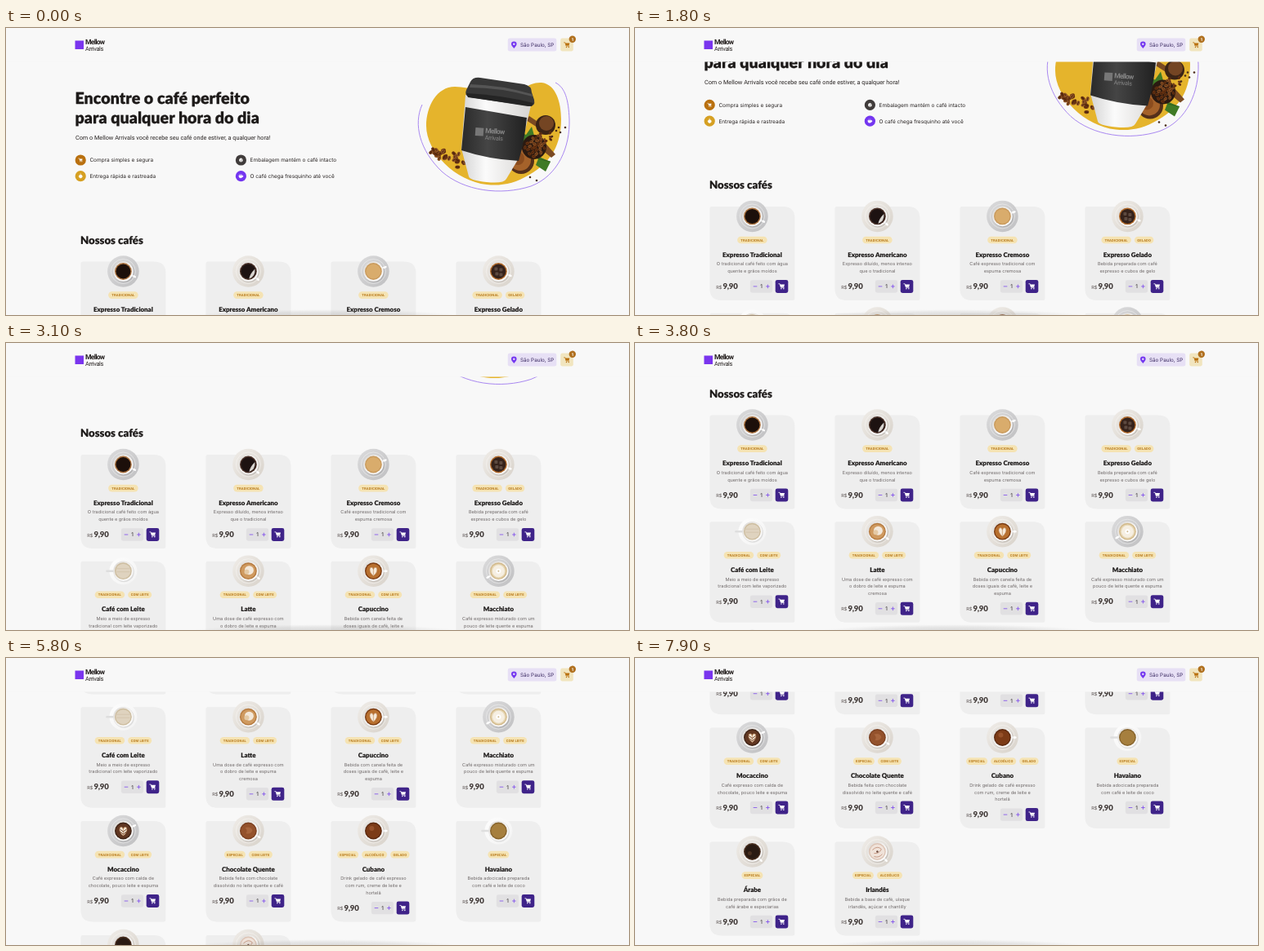
Recreate the animation shown at these times as an HTML page. Size 762x352 px, loop 8000 ms.

```html
<!DOCTYPE html>
<html lang="pt-BR">
<head>
<meta charset="utf-8">
<style>
html, body { margin: 0; width: 100%; height: 100%; overflow: hidden; background: #f8f8f8 }
svg { display: block; width: 762px; height: 352px; text-rendering: geometricPrecision }
text { font-family: Inter, Roboto, sans-serif; fill: #272221 }
.h { font-family: Lato, "Open Sans", sans-serif; font-weight: 900; fill: #1d1a19; stroke: #1d1a19; stroke-width: .015em; stroke-linejoin: round }
.h1 { font-size: 19.6px; letter-spacing: .05px }
.h2 { font-size: 13.2px; letter-spacing: 0 }
.name { font-size: 7.9px; letter-spacing: 0; text-anchor: middle }
.price { font-size: 9.6px; letter-spacing: -.2px; fill: #403937; stroke: none }
.lead { font: 7.28px Roboto, sans-serif }
.item { font-size: 6.46px }
.desc { font-size: 5.58px; fill: #6f6969; text-anchor: middle }
.tag { font: bold 4.2px Roboto, sans-serif; letter-spacing: .1px; fill: #b87a1c; text-anchor: middle }
.mid { text-anchor: middle }
.brand { font: bold 8.6px Roboto, sans-serif; letter-spacing: -.75px }
.brand2 { font: 7.4px Roboto, sans-serif; letter-spacing: -.35px }
</style>
</head>
<body>
<svg id="stage" viewBox="0 0 762 352">
<defs>
  <radialGradient id="shade"><stop stop-color="#888" stop-opacity=".32"/><stop offset=".65" stop-color="#999" stop-opacity=".18"/><stop offset="1" stop-color="#aaa" stop-opacity="0"/></radialGradient>
  <linearGradient id="paper"><stop stop-color="#d4d4d4"/><stop offset=".35" stop-color="#fbfbfb"/><stop offset="1" stop-color="#d6d4d2"/></linearGradient>
  <linearGradient id="sleeve"><stop stop-color="#2a2a2a"/><stop offset=".4" stop-color="#454545"/><stop offset="1" stop-color="#202020"/></linearGradient>
  <linearGradient id="gray" x2="1" y2="1"><stop stop-color="#dcdcdd"/><stop offset="1" stop-color="#bfbfc1"/></linearGradient>
  <linearGradient id="cream" x2="1" y2="1"><stop stop-color="#f0ede9"/><stop offset="1" stop-color="#d8d2ca"/></linearGradient>
  <linearGradient id="white" x2="1" y2="1"><stop stop-color="#fdfdfd"/><stop offset="1" stop-color="#f3f3f3"/></linearGradient>
  <linearGradient id="china" x2="1" y2="1"><stop stop-color="#d9d6d2"/><stop offset=".5" stop-color="#f4f2f0"/><stop offset="1" stop-color="#fff"/></linearGradient>
  <g id="cart"><path d="M-4-3.5h1.5l1.5 5h4.2" fill="none" stroke="currentColor" stroke-width=".9" stroke-linecap="round"/><path d="M-2.4-2.7h6.4l-1 3.5h-4.4z" fill="currentColor"/><circle cx="-.6" cy="3.1" r=".85" fill="currentColor"/><circle cx="2.7" cy="3.1" r=".85" fill="currentColor"/></g>
  <path id="timer" d="M0-2a2.4 2.4 0 1 0 .1 0zM-.9-3.3h1.8" fill="#fff" stroke="#fff" stroke-width=".6"/>
  <path id="box" d="M0-3.2l2.8 1.6v3.2L0 3.2l-2.8-1.6v-3.2zM0 0v3M0 0l2.6-1.5" fill="#fff" stroke="#403937" stroke-width=".5"/>
  <path id="mug" d="M-3-1h5v1q0 2.6-2.5 2.6T-3 0zM2-.6q1.8 0 .9 1.4l-1 .4M-1.8-3v1.1M-.5-3v1.1M.8-3v1.1" fill="#fff" stroke="#fff" stroke-width=".55"/>
</defs>
<g id="page"></g>
<g id="bar"></g>
</svg>
<script>
const text = (x, y, cls, s, more = '') => `<text x="${x}" y="${y}" class="${cls}" ${more}>${s}</text>`;
const rect = (x, y, w, h, r, fill) => `<rect x="${x}" y="${y}" width="${w}" height="${h}" rx="${r}" fill="${fill}"/>`;
const dot = (x, y, r, fill, more = '') => `<circle cx="${x}" cy="${y}" r="${r}" fill="${fill}" ${more}/>`;
const path = (d, fill, more = '') => `<path d="${d}" fill="${fill}" ${more}/>`;
const icon = (id, x, y, color, k = 1) => `<use href="#${id}" transform="translate(${x} ${y}) scale(${k})" color="${color}"/>`;
const oval = (x, y, rx, ry, a, fill) => `<ellipse rx="${rx}" ry="${ry}" transform="translate(${x} ${y}) rotate(${a})" fill="${fill}"/>`;

let seed = 5;
const rnd = () => (seed = seed * 16807 % 2147483647) / 2147483647;
function bean(x, y, r = 3) {
  const a = rnd() * 180;
  return oval(x, y, r, r * .7, a, rnd() < .5 ? '#6b3513' : '#8f5426') + oval(x, y, r * .8, .4, a + 8, '#3c1c0a');
}

function hero() {
  let s = path('M514 120C514 96 527 72 549 72C571 72 590 84 612 82C630 80 638 66 655 67C673 69 679 92 679 112C679 142 668 164 640 180C622 191 605 194 588 192C550 188 514 152 514 120Z', '#e5b42c')
    + path('M509 94C498 118 506 150 533 176C560 200 605 206 642 194C676 181 690 145 689 112C688 88 684 73 672 67', 'none', 'stroke="#a07bf0" stroke-width=".9"');
  for (let i = 0; i < 30; i++) {
    const k = rnd();
    s += bean(520 + k * 42, 151 + k * 16 + (rnd() - .5) * (9 + 15 * k));
  }
  // spoons, leaves and grounds
  s += path('M627 144L624 125L636 131L643 121L648 139L634 152ZM652 158L666 164L660 176L648 168Z', '#3f7a26')
    + path('M624 125L636 147M666 164L650 160', 'none', 'stroke="#28521a" stroke-width=".7"')
    + path('M640 108L652 116L650 122L636 113ZM656 137L672 155L667 159L650 145Z', '#7a4a22')
    + dot(630, 163, 16, '#54301a') + dot(629, 162, 13, '#a5622a') + dot(626, 160, 8, '#8b4c1e')
    + dot(660, 119, 12, '#3b2416') + dot(661, 117, 9, '#744523')
    + dot(646, 146, 15, '#2b1a11');
  for (let i = 0; i < 20; i++) {
    const a = i * 2.4, r = 2.7 * Math.sqrt(i);
    s += bean(646 + r * Math.cos(a), 146 + r * Math.sin(a), 2.5);
  }
  for (let i = 0; i < 16; i++) s += bean(648 + rnd() * 24, 131 + (rnd() - .5) * 10 + i, 2.2);
  for (const [x, y] of [[676, 122], [684, 122], [678, 128], [673, 126], [641, 183], [649, 187], [668, 133]])
    s += dot(x, y, 1.3, '#4a2c18');
  return s
    + path('M562 82L642 95L627 160L612 185Q609 191 588 189Q567 187 566 182L557 148Z', 'url(#paper)')
    + path('M562 97L637 110Q634 140 627 163Q590 161 557 150Z', 'url(#sleeve)')
    + path('M568 66Q571 60 580 61L634 69Q643 71 643 79L646 88Q648 97 638 96L568 85Q560 83 563 76Z', '#383838')
    + path('M568 69Q605 70 643 81L644 84Q605 73 567 73Z', '#555')
    + path('M563 80Q605 82 645 92L643 96L565 85Z', '#242424')
    + `<g transform="rotate(4 575 128)">` + rect(574, 122, 10, 10, 0, '#777')
    + text(586, 128, 'brand', 'Mellow', 'style="fill:#858585"') + text(586, 136, 'brand2', 'Arrivals', 'style="fill:#858585"') + '</g>';
}

function intro() {
  const items = [
    [91.2, 162, '#b9700f', 'cart', 'Compra simples e segura'],
    [91.2, 181.7, '#d6a023', 'timer', 'Entrega rápida e rastreada'],
    [287.4, 162, '#403c3b', 'box', 'Embalagem mantém o café intacto'],
    [287.4, 181.7, '#7436f0', 'mug', 'O café chega fresquinho até você']
  ];
  return text(84.5, 92.5, 'h h1', 'Encontre o café perfeito') + text(84.5, 117, 'h h1', 'para qualquer hora do dia')
    + text(85, 137, 'lead', 'Com o Mellow Arrivals você recebe seu café onde estiver, a qualquer hora!')
    + items.map(([x, y, c, id, s]) => dot(x, y, 6.6, c) + icon(id, x, y, '#fff', id == 'cart' ? .6 : .85) + text(x + 11.2, y + 2.4, 'item', s)).join('')
    + text(91, 265, 'h h2', 'Nossos cafés');
}

// surface details, drawn around the cup centre
const leaf = path('M0 6Q-6 1-4-4Q-1-6 0-2Q1-6 4-4Q6 1 0 6ZM0 5V-4', '#f6e9d8', 'stroke="#b98452" stroke-width=".6"');
const fern = leaf + path('M-4-2L0 1L4-2M-4 1L0 4L4 1', 'none', 'stroke="#62341d" stroke-width=".9"');
const foam = dot(1, -1, 5.5, '#f3e8da') + dot(-2, 1, 3, '#e4c9a5');
const glare = path('M8-3Q9 6 1 9Q2 3 8-3Z', '#d8d4cf');
const ice = [[-3, -3], [3, -2], [-2, 3], [3, 4]].map(([x, y]) => rect(x - 2, y - 2, 4, 4, 1, '#5d4a40')).join('');
const ring = dot(0, 0, 7.5, '#f6efe2') + dot(0, 0, 3, '#fff') + dot(0, 0, 1, '#cdb78c');
const swirl = path('M-6-2Q0-8 5-3Q2 3-4 2M-4 6Q2 8 6 3', 'none', 'stroke="#c79a85"') + dot(0, 0, 1.2, '#6a4537');
const cream = path('M-4-4Q4-6 5 0Q2 5-3 3Q0 0-4-4Z', '#a7653d');
const streak = path('M-9-3H9M-8 1H8', 'none', 'stroke="#d4c6ae"');

const T = 'TRADICIONAL', L = 'COM LEITE', E = 'ESPECIAL', A = 'ALCOÓLICO', G = 'GELADO';
const tagWidth = { [T]: 36.5, [L]: 29, [E]: 26, [A]: 31, [G]: 23.5 };
// name, description, tags, saucer, coffee edge, coffee, handle angle, detail
const coffees = [
  ['Expresso Tradicional', 'O tradicional café feito com água|quente e grãos moídos', [T], 'gray', '#a9713f', '#1c0f0a', 25, ''],
  ['Expresso Americano', 'Expresso diluído, menos intenso|que o tradicional', [T], 'cream', '#4a3128', '#1d1211', 40, glare],
  ['Expresso Cremoso', 'Café expresso tradicional com|espuma cremosa', [T], 'gray', '#c99a5c', '#d9ac6c', -20, ''],
  ['Expresso Gelado', 'Bebida preparada com café|expresso e cubos de gelo', [T, G], 'cream', '#b0692a', '#35221b', 20, ice],
  ['Café com Leite', 'Meio a meio de expresso|tradicional com leite vaporizado', [T, L], 'white', '#cdbd9f', '#dfd3bf', 180, streak],
  ['Latte', 'Uma dose de café expresso com|o dobro de leite e espuma|cremosa', [T, L], 'cream', '#b57a3f', '#cf9a60', 35, foam],
  ['Capuccino', 'Bebida com canela feita de|doses iguais de café, leite e|espuma', [T, L], 'cream', '#7a3b12', '#b8702f', 0, leaf],
  ['Macchiato', 'Café expresso misturado com um|pouco de leite quente e espuma', [T, L], 'gray', '#d2b98a', '#e6d6b4', 150, ring],
  ['Mocaccino', 'Café expresso com calda de|chocolate, pouco leite e espuma', [T, L], 'gray', '#3f2417', '#613722', -25, fern],
  ['Chocolate Quente', 'Bebida feita com chocolate|dissolvido no leite quente e café', [E, L], 'cream', '#7d4222', '#94522c', 30, cream],
  ['Cubano', 'Drink gelado de café expresso|com rum, creme de leite e|hortelã', [E, A, G], 'cream', '#5c2a10', '#7c3b17', 0, dot(-2, -3, 3, '#96512a')],
  ['Havaiano', 'Bebida adocicada preparada|com café e leite de coco', [E], 'white', '#87642c', '#a67f3e', 180, ''],
  ['Árabe', 'Bebida preparada com grãos de|café árabe e especiarias', [E], 'cream', '#4b3020', '#2a1a12', 45, dot(-3, 2, 2.5, '#4a3020')],
  ['Irlandês', 'Bebida a base de café, uísque|irlandês, açúcar e chantilly', [E, A], 'cream', '#dcc3b4', '#f0e3da', 45, swirl]
];
const tops = [286.5, 417.2, 557, 697], heights = [115, 123.5, 123.5, 115];

function cup(saucer, edge, coffee, angle, detail) {
  const plain = saucer == 'white';
  return `<g transform="translate(52 12)">` + (plain ? oval(0, 0, 17, 16.5, 0, 'url(#white)') : dot(0, 0, 19.3, `url(#${saucer})`) + dot(0, 0, 15, 'none', 'stroke="#fff" stroke-opacity=".4"'))
    + `<path d="M11 0H${plain ? 20 : 16}" transform="rotate(${angle})" stroke="${plain ? '#dedede' : '#fff'}" stroke-width="2.4" stroke-linecap="round"/>`
    + dot(.8, 1, 12.6, '#000', 'opacity=".1"') + dot(0, 0, 12.2, 'url(#china)') + dot(0, 0, 10.4, edge) + dot(0, 0, 9, coffee) + detail + '</g>';
}

function card([name, desc, tags, ...look], i) {
  const row = i >> 2, h = heights[row], lines = desc.split('|');
  const y = 98 + (lines.length - 2) * 8.6;
  let x = 52 - (tags.reduce((w, t) => w + tagWidth[t], 0) + 4 * (tags.length - 1)) / 2;
  let s = `<g transform="translate(${91.4 + i % 4 * 153} ${tops[row]})">`
    + path(`M2.5 0H89.5Q104 0 104 14.5V${h - 2.5}q0 2.5-2.5 2.5H14.5Q0 ${h} 0 ${h - 14.5}V2.5Q0 0 2.5 0Z`, '#eee') + cup(...look);
  for (const t of tags) {
    const w = tagWidth[t];
    s += rect(x, 36.8, w, 8.6, 4.3, '#f5e3b3') + text(x + w / 2, 42.6, 'tag', t);
    x += w + 4;
  }
  s += text(52, 61.6, 'h name', name) + lines.map((l, n) => text(52, 72.4 + n * 8.6, 'desc', l)).join('');
  return s + text(7.8, y + 2.6, 'desc', 'R$', 'style="text-anchor:start;fill:#574f4d"') + text(16, y + 3, 'h price', '9,90')
    + rect(49.5, y - 7.7, 27.2, 15.4, 2.4, '#e1e0e2') + rect(80.3, y - 8, 15.6, 16, 2.4, '#3f2389')
    + path(`M53.3 ${y}h4.6M68.7 ${y}h4.6m-2.3-2.3v4.6`, 'none', 'stroke="#7b48ec" stroke-width=".8"')
    + text(63.2, y + 2.4, 'item mid', '1') + icon('cart', 88, y, '#fff', .9) + '</g>';
}

const $ = id => document.getElementById(id);
$('page').innerHTML = hero() + intro() + coffees.map(card).join('');
$('bar').innerHTML = rect(0, 0, 762, 41.5, 0, '#f8f8f8')
  + rect(84.5, 15.5, 10.5, 10.5, 0, '#7a35ee') + text(97, 20.2, 'brand', 'Mellow') + text(97, 28, 'brand2', 'Arrivals')
  + rect(613.8, 12.6, 59.5, 16, 2.4, '#e7e0f5')
  + path('M621.3 25Q618 21.6 618 19.8A3.3 3.3 0 0 1 624.6 19.8Q624.6 21.6 621.3 25Z', '#7436f0') + dot(621.3, 19.8, 1.2, '#e7e0f5')
  + text(629, 23.2, 'item', 'São Paulo, SP', 'style="fill:#37265f;font-size:6.3px"')
  + rect(678.2, 12.6, 15.6, 16, 2.4, '#f1e5bf') + icon('cart', 686, 20.8, '#b9700f', .85)
  + dot(692.8, 13.8, 4.2, '#b0701f') + text(692.8, 15.6, 'mid', '1', 'style="font-size:5px;font-weight:bold;fill:#fff"')
  + oval(390, 354, 165, 9, 0, 'url(#shade)');

// scroll path: [time, offset]
const keys = [[700, 0], [1200, 33], [2400, 103], [3800, 198], [4700, 262], [5800, 357], [7900, 471.5]];
const slope = (a, b) => (keys[b][1] - keys[a][1]) / (keys[b][0] - keys[a][0]);
const tangent = i => slope(Math.max(i - 1, 0), Math.min(i + 1, keys.length - 1));
function scrollAt(t) {
  if (t <= 700) return 0;
  const i = Math.max(0, keys.findIndex(k => t <= k[0]) - 1);
  const [t0, y0] = keys[i], [t1, y1] = keys[i + 1], d = t1 - t0, u = (t - t0) / d;
  const v = 1 - u;
  return v * v * (1 + 2 * u) * y0 + u * v * v * d * tangent(i) + u * u * (3 - 2 * u) * y1 - u * u * v * d * tangent(i + 1);
}

function draw() {
  const t = Math.floor(performance.now() % 8000 / 100) * 100;
  $('page').setAttribute('transform', `translate(0 ${-scrollAt(t)})`);
  requestAnimationFrame(draw);
}
draw();
</script>
</body>
</html>
```
